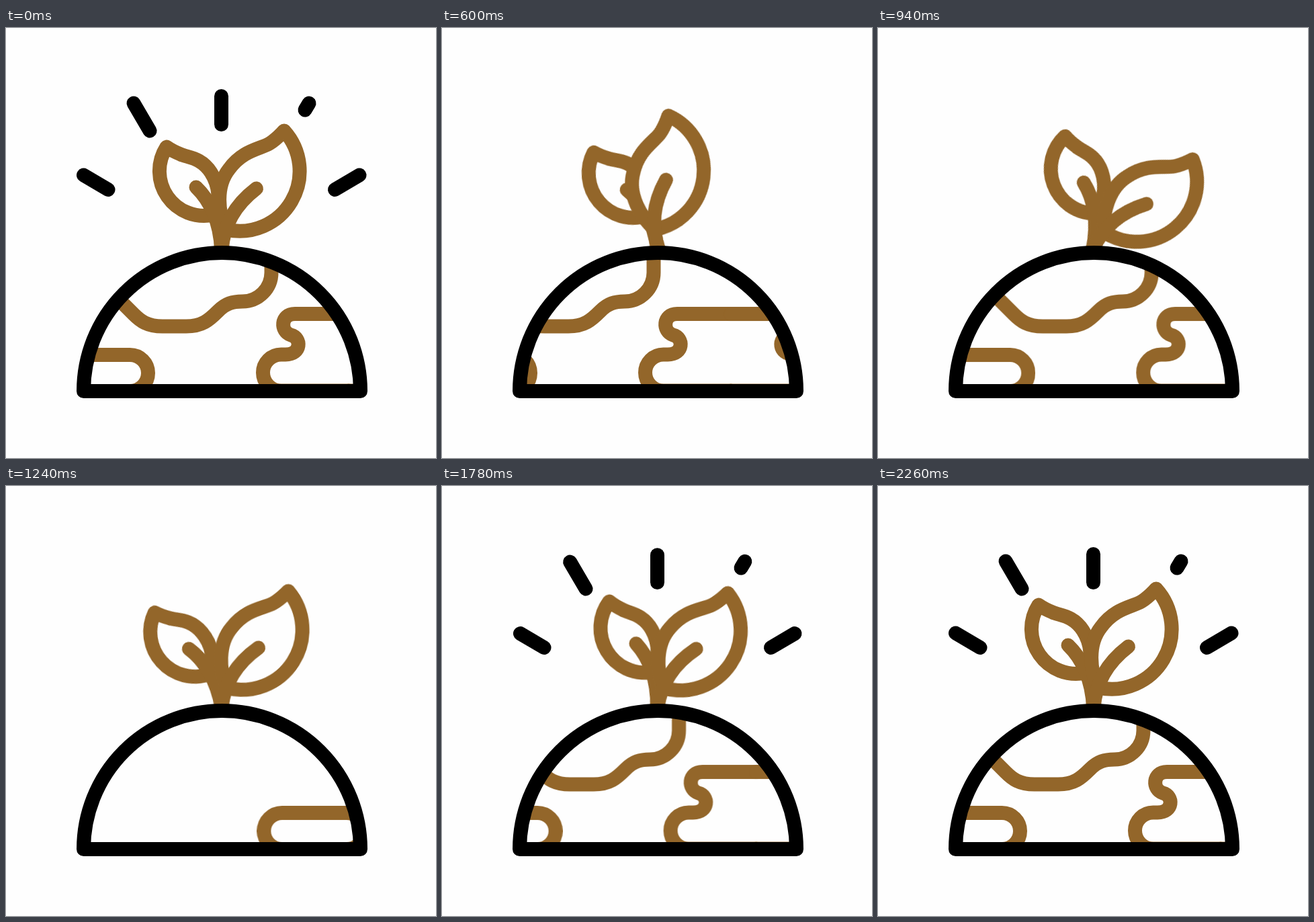
These frames come from a looping animation (640x640 px, 2.4 s). An HTML page:

```html
<!DOCTYPE html>
<html lang="en">
<head>
<meta charset="utf-8">
<title>Sprouting globe</title>
<style>
  html, body { margin: 0; width: 100%; height: 100%; overflow: hidden; background: #fefefe; }
  svg { display: block; width: 100%; height: 100%; }

  .line { fill: none; stroke: #93662a; stroke-width: 21; stroke-linecap: round; stroke-linejoin: round; }
  .fill { fill: #fefefe; }
  .ink { stroke: #000; }
  .rays { stroke-dasharray: 1 2; }

  .map, .leaf, .rays { animation: 2400ms cubic-bezier(.37, 0, .63, 1) infinite; }
  .map { animation-name: spin; }
  .leaf { transform-origin: 322px 326px; }
  .left { animation-name: sway-left; }
  .right { animation-name: sway-right; }
  .rays { animation-name: shine; }

  /* A short swing back, then one full turn */
  @keyframes spin {
    0% { transform: translateX(0); }
    25% { transform: translateX(-80px); animation-timing-function: cubic-bezier(.51, 0, .462, 1); }
    84.8%, 100% { transform: translateX(900px); }
  }
  @keyframes sway-left {
    0%, 90%, 100% { transform: rotate(0deg); }
    18.75% { transform: rotate(-13deg); }
    36.7% { transform: rotate(15.7deg); }
    52.5% { transform: rotate(-7.2deg); }
    73.3% { transform: rotate(3.8deg); }
  }
  @keyframes sway-right {
    0%, 94.2%, 100% { transform: rotate(0deg); }
    25% { transform: rotate(-23.6deg); }
    40% { transform: rotate(20.6deg); }
    60.6% { transform: rotate(-9.9deg); }
    75.8% { transform: rotate(4.2deg); }
  }
  @keyframes shine {
    0%, 77.5%, 100% { stroke-dashoffset: 0; }
    16% { stroke-dashoffset: 1.01; }
    65% { stroke-dashoffset: 1.01; animation-timing-function: cubic-bezier(.215, .61, .355, 1); }
  }
</style>
</head>
<body>
<svg viewBox="0 0 640 640">
  <defs>
    <path id="dome" d="M115.5 540.5A206 206 0 0 1 527.5 540.5Z"/>
    <clipPath id="inside"><use href="#dome"/></clipPath>
    <path id="coast" d="M510 425.5H430C408 425.5 408 452 424 457C440 461 440 486 416 486H409.5A27 27 0 0 0 409.5 540H510"/>
    <g id="land">
      <path d="M395 310V364A43 43 0 0 1 352 407C337 407 327 410 316 421C302 435 292 444 268 444H233C210 444 200 436 190 426L90 326"/>
      <use href="#coast"/>
      <use href="#coast" transform="matrix(-1 0 0 1 1020 0)"/>
      <rect x="61.5" y="486.5" width="150" height="54" rx="27"/>
    </g>
  </defs>

  <g class="line leaf left">
    <path class="fill" d="M239 177A66.5 66.5 0 0 0 309 278C320 262 318 235 305 215C290 192 270 193 260 188C250 184 246 182 239 177Z"/>
    <path d="M283 237C303 256 319 288 320.5 330"/>
  </g>
  <g class="line leaf right">
    <path class="fill" d="M414 153A89.3 89.3 0 0 1 328 300C315 275 312 235 332 210C352 182 378 180 392 172C402 166 407 160 414 153Z"/>
    <path d="M372.5 239C345 260 324 290 321 330"/>
  </g>

  <use href="#dome" class="fill"/>
  <g clip-path="url(#inside)">
    <g class="line map">
      <use href="#land"/>
      <use href="#land" x="-900"/>
    </g>
  </g>
  <use href="#dome" class="line ink"/>

  <!-- Each ray runs from its inner end to its outer end -->
  <g class="line ink rays">
    <path pathLength="1" d="M152 240.5L115.5 219"/>
    <path pathLength="1" d="M214 153L190 112"/>
    <path pathLength="1" d="M320.5 143.5V101.5"/>
    <path pathLength="1" d="M445 122L451 112"/>
    <path pathLength="1" d="M489.5 240.5L526 219"/>
  </g>
</svg>
</body>
</html>
```
